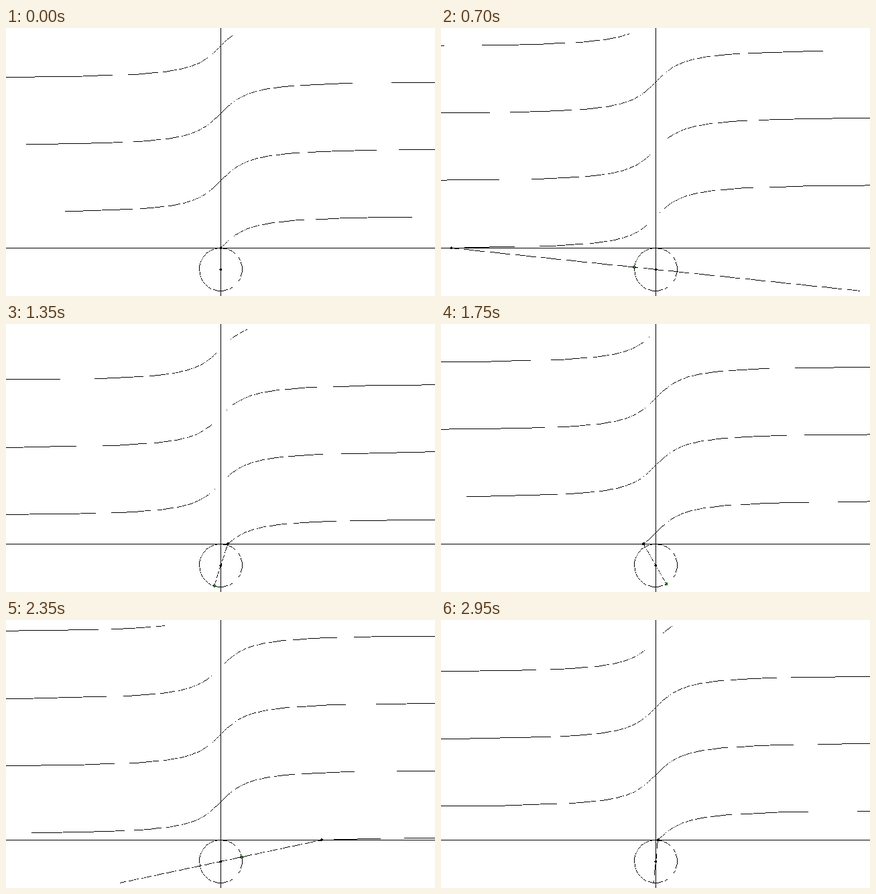
Write a matplotlib script that moves like this. It is 640x400 px and loops after 3000 ms.

```python
import numpy as np
import matplotlib.pyplot as plt
from matplotlib.animation import FuncAnimation

W, H, DPI = 640, 400, 100
FRAMES, INTERVAL = 60, 50

# Thin one-pixel lines are rastered on a finer grid and box-filtered 5:4,
# which gives the strokes their broken look.
GW, GH = 800, 500
UNIT, OX, OY = 40, 400, 410
BOX = np.array([[.8, .2, 0, 0, 0],
                [0, .6, .4, 0, 0],
                [0, 0, .4, .6, 0],
                [0, 0, 0, .2, .8]])
ROWS = np.kron(np.eye(GH // 5), BOX)
COLS = np.kron(np.eye(GW // 5), BOX).T

GREEN = 176
HEIGHT = np.linspace(0, 10, 101)
TURN = np.append(np.arange(0, 2 * np.pi, 0.1), 2 * np.pi)


def grid(x, y):
    """Plane units to integer grid cells."""
    px = np.floor(OX + UNIT * np.asarray(x) + 0.5)
    py = np.floor(OY - UNIT * np.asarray(y) + 0.5)
    return px, py


def plot(ink, px, py):
    px = np.floor(px + 0.5).astype(int)
    py = np.floor(py + 0.5).astype(int)
    ok = (px >= 0) & (px < GW) & (py >= 0) & (py < GH)
    ink[py[ok], px[ok]] = 1


def polyline(ink, x, y, keep=None):
    px, py = grid(x, y)
    for i in range(len(px) - 1):
        if keep is not None and not keep[i]:
            continue
        if max(px[i], px[i + 1]) < 0 or min(px[i], px[i + 1]) >= GW:
            continue
        n = int(max(abs(px[i + 1] - px[i]), abs(py[i + 1] - py[i]), 1)) + 1
        plot(ink, np.linspace(px[i], px[i + 1], n),
             np.linspace(py[i], py[i + 1], n))


def dot(ink, green, x, y, filled):
    px, py = grid(x, y)
    for dy in range(-2, 3):
        for dx in range(-2, 3):
            cx, cy = int(px) + dx, int(py) + dy
            if abs(dx * dy) == 4 or not (0 <= cx < GW and 0 <= cy < GH):
                continue
            ink[cy, cx] = 1
            green[cy, cx] = filled and max(abs(dx), abs(dy)) < 2


def backdrop():
    ink = np.zeros((GH, GW))
    ink[OY, :] = 1
    ink[:, OX] = 1
    polyline(ink, np.cos(TURN), np.sin(TURN) - 1)
    return ink


BASE = backdrop()


def render(k):
    ink, green = BASE.copy(), np.zeros((GH, GW))
    theta = 2 * np.pi * k / FRAMES

    # rising trace of the point where the ray meets the axis
    x = np.clip(np.tan(HEIGHT - theta), -2000, 2000)
    polyline(ink, x, HEIGHT, keep=np.diff(x) > 0)

    # ray through the circle's centre, cut to the stage
    t = np.clip(np.tan(theta), -2000, 2000)
    s = min(1, 11 / max(abs(t), 1e-9))
    polyline(ink, [-t * s, t * s], [s - 1, -s - 1])

    dot(ink, green, -np.sin(theta), np.cos(theta) - 1, True)
    dot(ink, green, 0, -1, False)
    dot(ink, green, -t, 0, False)

    cover = ROWS @ ink @ COLS
    tint = ROWS @ green @ COLS
    dark = cover > 0.5
    img = np.full((H, W, 3), 255, np.uint8)
    img[dark] = 0
    img[dark, 1] = (GREEN * tint[dark] / cover[dark]).astype(np.uint8)
    return img


fig = plt.figure(figsize=(W / DPI, H / DPI), dpi=DPI, facecolor="white")
ax = fig.add_axes([0, 0, 1, 1])
ax.axis("off")
stage = ax.imshow(render(0), interpolation="nearest", aspect="auto")


def update(k):
    stage.set_data(render(k))
    return [stage]


anim = FuncAnimation(fig, update, frames=FRAMES, interval=INTERVAL,
                     repeat=True, repeat_delay=0, blit=False)
plt.show()
```
